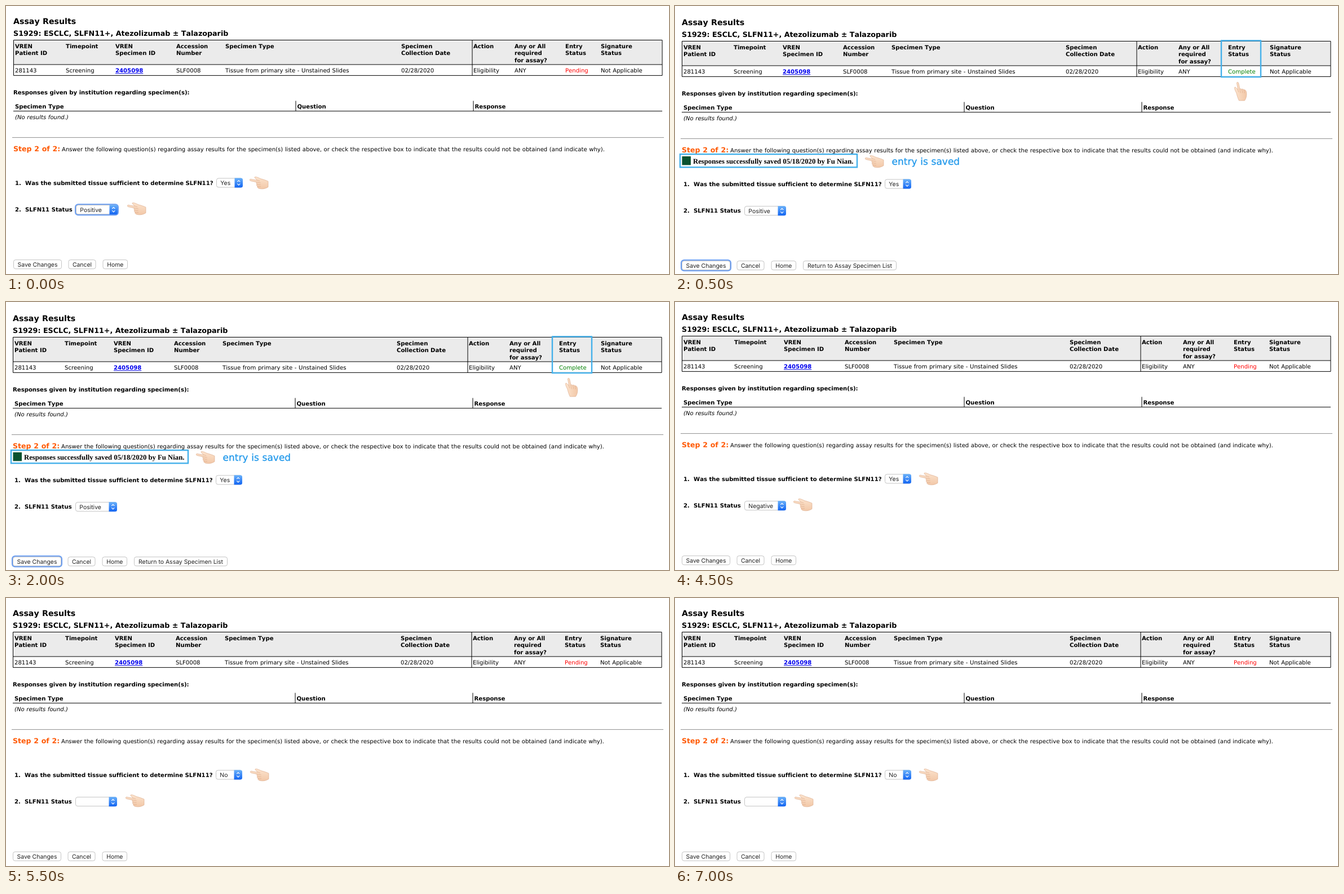
Animation of 1176x476 px, one loop 8000 ms. Source, as an HTML page:

```html
<!DOCTYPE html>
<html lang="en">
<head>
<meta charset="utf-8">
<title>Assay Results</title>
<style>
  html, body { margin: 0; width: 100%; height: 100%; overflow: hidden; background: #fff; }
  svg { display: block; }
  text {
    font: 10.1px "DejaVu Sans", sans-serif; word-spacing: .36px; white-space: pre;
    text-rendering: geometricPrecision; font-kerning: none; font-variant-ligatures: none;
  }
  .b { font-weight: bold; font-size: 10.12px; word-spacing: 0; }
  .i { font-style: italic; }
  .title { font-weight: bold; font-size: 14.2px; }
  .sub { font-weight: bold; font-size: 12.7px; word-spacing: 0; }
  .step { font-weight: bold; font-size: 12.55px; fill: #ff5a05; }
  .link { font-weight: bold; font-size: 10.12px; fill: #00e; text-decoration: underline; }
  .red { fill: #f00; }
  .green { fill: #008000; }
  .ui { font: 10.45px Inter, sans-serif; fill: #222; word-spacing: 0; }
  .saved { font: bold 12.73px "Liberation Serif", serif; word-spacing: 0; }
  .note { font-size: 17px; fill: #1c96ea; stroke: #1c96ea; stroke-width: .25px; }
</style>
</head>
<body>
<svg width="1176" height="476" viewBox="0 0 1176 476">
  <defs>
    <linearGradient id="blue" x2="0" y2="1">
      <stop stop-color="#6bb2fa"/><stop offset="1" stop-color="#1264f2"/>
    </linearGradient>
    <linearGradient id="skin" x2="0" y2="1">
      <stop stop-color="#fce3cd"/><stop offset="1" stop-color="#f2c8a8"/>
    </linearGradient>
    <g id="hand" stroke="#d9a583" stroke-width=".6">
      <path fill="url(#skin)" d="M1.5 5.4L13 7.4C12 5 8.5 3.6 9 2C10 .6 16 2.6 19 4.6C24 6 29 7.4 33 9.4L33 19.4C28 23 21 23.6 16.5 22C14 21 13.4 19.6 14 18.2C12.2 17 12 15.4 13 14.2C11.6 13.2 11.6 11.6 12.6 10.9L1.6 8.6C0 8 0 5.6 1.5 5.4Z"/>
      <path fill="none" d="M13 7.4q3 .4 5 1.6M12.6 10.9l7 1.2M13 14.2q3 1.4 6.6 1.2M14 18.2q3 1.2 6 .6"/>
    </g>
  </defs>
  <g id="page"></g>
</svg>
<script>
const WIDE = [15, 105, 193, 301, 388, 700, 828, 901, 991, 1054];
const TIGHT = [15, 104, 191, 298, 384, 693, 821, 893, 981, 1055];
const HEADS = ['VREN|Patient ID', 'Timepoint', 'VREN|Specimen ID', 'Accession|Number', 'Specimen Type',
  'Specimen|Collection Date', 'Action', 'Any or All|required|for assay?', 'Entry|Status', 'Signature|Status'];
const ROW = ['281143', 'Screening', '2405098', 'SLF0008', 'Tissue from primary site - Unstained Slides',
  '02/28/2020', 'Eligibility', 'ANY', '', 'Not Applicable'];

// hands: positions of the left-pointing hands
const SCENES = [
  { end: 500, dx: 1, dy: 0, answer: 'Yes', status: 'Positive', focus: true, hands: [[431, 302], [214, 348]] },
  { end: 3000, dx: 0, dy: 2, answer: 'Yes', status: 'Positive', saved: true, hands: [[337, 262]] },
  { end: 5500, dx: 0, dy: 0, answer: 'Yes', status: 'Negative', hands: [[433, 302], [210, 348]] },
  { end: 8000, dx: 0, dy: 0, answer: 'No', status: '', hands: [[433, 302], [212, 348]] }
];

const text = (x, y, s, cls = '', extra = '') => `<text x="${x}" y="${y}" class="${cls}" ${extra}>${s}</text>`;
const rect = (x, y, w, h, style) => `<rect x="${x}" y="${y}" width="${w}" height="${h}" ${style}/>`;
const line = (d, color = '#000') => `<path d="${d}" fill="none" stroke="${color}"/>`;

function control(x, y, w, focus) {
  const ring = focus ? rect(x - .5, y - .5, w + 1, 18, 'rx="4.5" fill="none" stroke="#6b9ef2" stroke-width="3"') : '';
  return ring + rect(x + .5, y + .5, w - 1, 16, 'rx="3.5" fill="#fff" stroke="#c4c4c4"');
}

function select(x, y, w, label, focus) {
  const r = x + w, c = `${r - 7.2} ${y + 8.5}`;
  return control(x, y, w, focus) +
    `<path fill="url(#blue)" d="M${r - 14.5} ${y}h11q3.5 0 3.5 3.5v10q0 3.5-3.5 3.5h-11z"/>` +
    `<path transform="translate(${c})" fill="none" stroke="#fff" stroke-width="1.2" d="M-2.5-1.7l2.5-2.5 2.5 2.5M-2.5 1.7l2.5 2.5 2.5-2.5"/>` +
    text(x + 7.3, y + 12.4, label, 'ui');
}

const button = (x, w, label, focus) =>
  control(x, 450.3, w, focus) + text(x + w / 2, 462.7, label, 'ui', 'text-anchor="middle"');

function table(saved) {
  const cols = saved ? TIGHT : WIDE, split = cols[6] - 2;
  let out = rect(12.5, 60.5, 1150.5, 43.5, 'fill="#ebebeb"') +
    line(`M12.5 60.5H1163V123.4H12.5ZM12.5 104H1163M${split} 60.5V123.4`);
  cols.forEach((x, i) => {
    HEADS[i].split('|').forEach((s, k) => out += text(x, 74.7 + 12.4 * k, s, 'b'));
    out += i === 8 ? text(x, 118.3, saved ? 'Complete' : 'Pending', saved ? 'green' : 'red')
      : text(x, 118.3, ROW[i], i === 2 ? 'link' : '');
  });
  return out;
}

function savedNotes() {
  const box = 'fill="none" stroke="#43b0ea" stroke-width="2.4"';
  return rect(969, 59.5, 70, 64.5, box) + rect(9, 261.2, 314, 23.2, box) +
    rect(12.5, 265, 15.5, 15.5, 'fill="#0a5230"') +
    text(32, 277.8, 'Responses successfully saved 05/18/2020 by Fu Nian.', 'saved') +
    text(384.5, 279.8, 'entry is saved', 'note') +
    '<use href="#hand" transform="matrix(0 1 1 0 991 133)"/>' +
    button(227, 166, 'Return to Assay Specimen List');
}

function draw({ dx, dy, answer, status, focus, saved, hands }) {
  return `<g transform="translate(${dx} ${dy})">` +
    text(12, 32.3, 'Assay Results', 'title') +
    text(12, 53.2, 'S1929: ESCLC, SLFN11+, Atezolizumab ± Talazoparib', 'sub') +
    table(saved) +
    text(12, 157, 'Responses given by institution regarding specimen(s):', 'b') +
    text(15, 181.5, 'Specimen Type', 'b') + text(515.5, 181.5, 'Question', 'b') + text(830.5, 181.5, 'Response', 'b') +
    line('M12 186.7H1163M513 168.5V186.7M828 168.5V186.7') +
    text(15, 201, '(No results found.)', 'i') +
    line('M10 233.6H1166', '#8f8f8f') +
    text(12, 258, 'Step 2 of 2:', 'step') +
    text(98, 257.7, 'Answer the following question(s) regarding assay results for the specimen(s) listed above, or check the respective box to indicate that the results could not be obtained (and indicate why).') +
    text(15, 317.8, '1.', 'b') + text(33, 317.8, 'Was the submitted tissue sufficient to determine SLFN11?', 'b') +
    select(372, 305.5, 47, answer) +
    text(15, 365.4, '2.', 'b') + text(33, 365.4, 'SLFN11 Status', 'b') +
    select(123, 353.2, 74, status, focus) +
    button(12, 86, 'Save Changes', saved) + button(109.5, 49, 'Cancel') + button(170.5, 44.5, 'Home') +
    hands.map(([x, y]) => `<use href="#hand" x="${x}" y="${y}"/>`).join('') +
    (saved ? savedNotes() : '') + '</g>';
}

const page = document.getElementById('page');
const start = performance.now();
let shown;
function tick() {
  const t = (performance.now() - start) % 8000;
  const scene = SCENES.find(s => t < s.end);
  if (scene !== shown) page.innerHTML = draw(shown = scene);
  requestAnimationFrame(tick);
}
tick();
</script>
</body>
</html>
```
